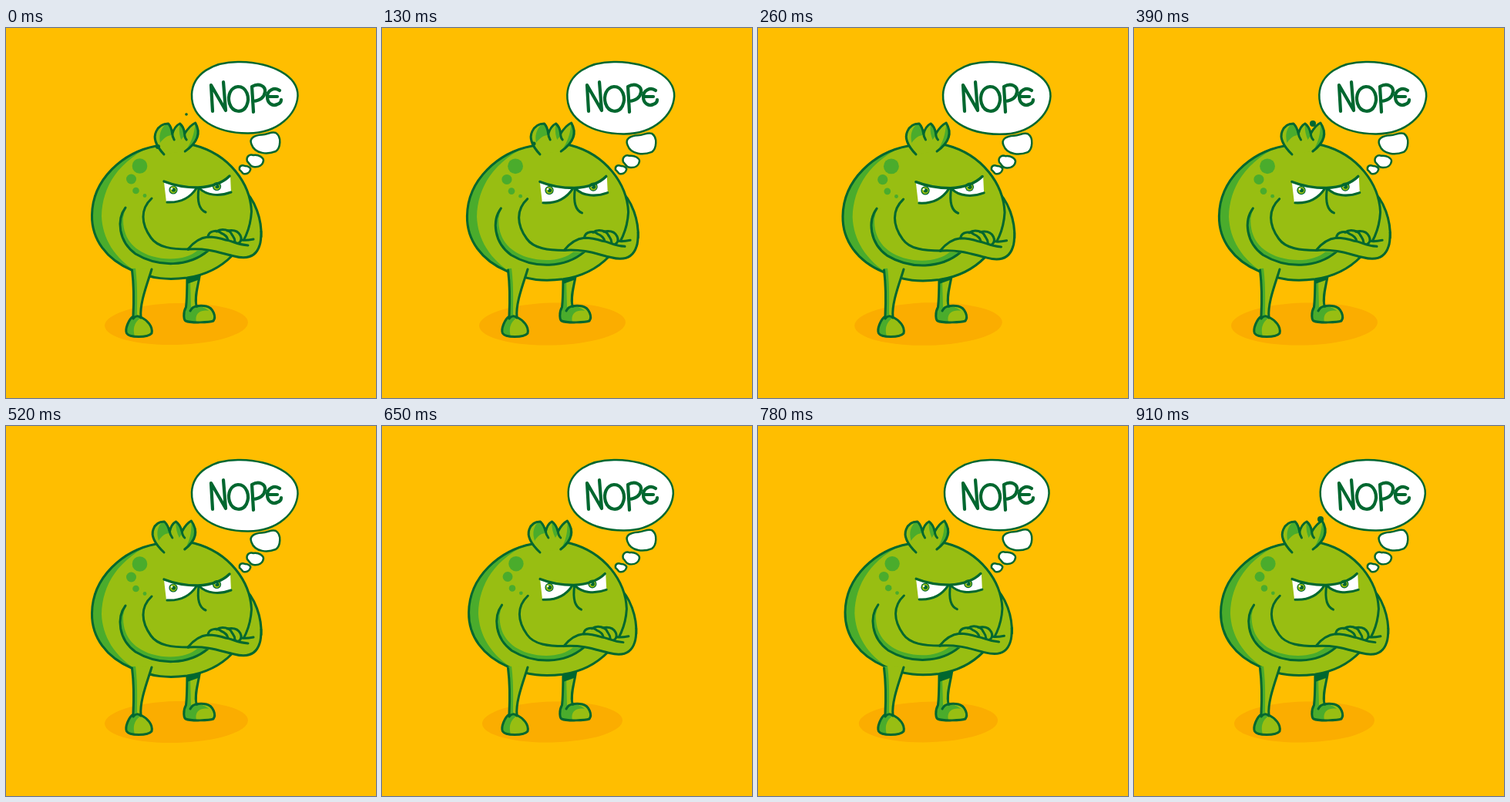
An HTML page with a canvas that plays this animation: 480 px wide and 480 px high, repeating every 1040 ms.

```html
<!DOCTYPE html>
<html lang="en">
<head>
<meta charset="utf-8">
<title>Nope</title>
<style>
html, body { margin: 0; width: 100%; height: 100%; overflow: hidden; background: #ffbe00; }
canvas { display: block; width: 480px; height: 480px; }
</style>
</head>
<body>
<canvas id="stage" width="480" height="480"></canvas>
<script>
const ctx = document.getElementById('stage').getContext('2d');
const STEP = 130, STEPS = 8;
const BG = '#ffbe00', SHADOW = '#fbad00', LIGHT = '#98be12', MID = '#4aac2c', INK = '#00672f', WHITE = '#fff';

const body = 'M195 153 C152 161 112 196 111.5 243 C111 274 130 300 163 314 C190 326 211 327 235 324 C282 317 316 283 318.5 238 C317 202 290 164 244 152 C228 149 210 149 195 153Z';
const upperArm = 'M306 208 C324 222 332 250 331 271 L300 285Z';
const forearm = 'M236 287 C244 277 252 272 262 271 C264 262 274 262 277 264 C281 259 287 259 291 263 C298 262 304 266 308 275 L321 274 L331 263 C331 290 323 298 308 298 C296 298 283 291 263 289.5Z';
const frontLeg = 'M163.5 312 C166 334 166 354 165 374 C159 378 154 391 156.5 396 C160 402 184 402 189 396 C191 387 183 379 175 375 C173 357 184 330 189 311Z';
const backLeg = 'M235 316 C235 335 235 350 233.5 362 C229 370 231 379 233 380 C240 383 264 382 269 380 C273 375 269 363 260 361 C255 360 251 360 247 361 C244 347 250 333 252 316Z';

function fill(d, color) {
  ctx.fillStyle = color;
  ctx.fill(new Path2D(d));
}

function line(d, width = 3) {
  ctx.strokeStyle = INK;
  ctx.lineWidth = width;
  ctx.stroke(new Path2D(d));
}

function shape(d, color, width) {
  fill(d, color);
  line(d, width);
}

// Shade kept inside a filled shape
function shaded(d, shade) {
  fill(d, LIGHT);
  ctx.save();
  ctx.clip(new Path2D(d));
  fill(shade, MID);
  ctx.restore();
}

function dot(x, y, r, color) {
  ctx.fillStyle = color;
  ctx.beginPath();
  ctx.arc(x, y, r, 0, Math.PI * 2);
  ctx.fill();
}

function scaled(x, y, k, draw) {
  ctx.save();
  ctx.translate(x, y);
  ctx.scale(k, k);
  ctx.translate(-x, -y);
  draw();
  ctx.restore();
}

function drawShadow(breath) {
  ctx.fillStyle = SHADOW;
  ctx.beginPath();
  ctx.ellipse(221, 384, 93 + 2.8 * breath, 27 + 0.7 * breath, -0.025, 0, Math.PI * 2);
  ctx.fill();
}

function drawBackLeg() {
  shaded(backLeg, 'M232 316 H239 C239 335 240 350 240 362 C247 360 257 361 263 367 C253 365 244 370 247 382 H229 V362Z');
  fill('M235 316 H252 L249 327 L235 332Z', INK);
  line(backLeg);
  line('M239 367 C241 363 244 361 248 361');
}

function drawFrontLeg() {
  shaded(frontLeg, 'M160 311 H168 C171 334 170 356 170 373 L175 376 C167 381 163 391 168 402 H150 V372 H162Z');
  line('M163.5 314 C166 334 166 354 165 374 C159 378 154 391 156.5 396 C160 402 184 402 189 396 C191 387 183 379 175 375 C173 357 184 330 189 313');
  line('M165 377 C168 373 172 373 175 376');
}

function drawEye(white, lid, x, y) {
  fill(white, WHITE);
  dot(x, y, 5.6, INK);
  dot(x, y, 4.4, LIGHT);
  dot(x + 0.5, y, 2.6, INK);
  dot(x - 2, y - 1.5, 1.3, WHITE);
  line(lid);
}

function drawFace() {
  drawEye('M205 200 C220 205 234 207 248 207 C239 222 224 228 208 226Z', 'M209 226 C226 227 239 220 247 208', 217, 210);
  drawEye('M251 208 C267 206 281 201 291 192 L292 213 C276 219 260 217 251 208Z', 'M292 213 C276 219 260 217 251 208', 273.5, 205.5);
  line('M205 199 C220 205 235 207 249 207 C267 206 280 202 290 192', 3.4);
  line('M250 208 C248 223 249 235 259 239');
}

function drawArms() {
  fill('M155 233 C143 249 146 277 168 293 C198 311 237 310 262 289 L248 289 C236 299 213 303 189 296 C164 288 151 271 152 246Z', MID);
  line('M155 233 C143 249 146 277 168 293 C198 311 237 310 262 289');
  line('M189 221 C174 235 175 254 188 272 C197 285 216 287 237 287');
  fill(forearm, LIGHT);
  line('M236 287 C244 277 252 272 262 271 C270 271 279 273 285 275 C294 276 299 281 314 282');
  line('M236 287 C264 285 281 293 296 296 C311 300 324 298 329 282 C331 277 331 269 331 264');
  line('M262 271 C263 262 275 262 279 266 C284 268 287 270 288 275');
  line('M273 264 C280 259 291 262 293 268 C295 271 297 273 297 277');
  line('M287 263 C297 261 302 265 304 269 C306 273 306 276 302 279');
  line('M306 275 C311 276 316 275 321 274');
}

function drawBody() {
  shape(upperArm, LIGHT);
  shaded(body, 'M195 150 C145 172 125 206 124 244 C125 272 140 299 172 318 L100 330 V150Z');
  line(body);
  dot(173.5, 179, 9.8, MID);
  dot(162.5, 196, 6.5, MID);
  dot(168.5, 211, 4.3, MID);
  dot(180, 217.5, 2.4, MID);
  drawFace();
  drawArms();
}

function drawCrown(sway) {
  ctx.save();
  ctx.transform(1, 0, -sway / 32, 1, sway * 164 / 32, 0);
  const leaves = 'M205 164 C195 154 189 143 193 134 C196 127 202 124 208 124 C212 128 213 132 214 137 C216 130 219 126 223 124 C227 127 229 131 230 137 C234 130 237 126 243 123 C252 137 247 149 232 160';
  shaded(leaves, 'M208 122 C199 129 196 138 199 149 C203 143 208 139 214 139Z M223 124 C222 131 223 138 226 145 L231 138Z M243 122 C243 136 240 148 232 160 L252 150 V122Z');
  line(leaves);
  line('M214 136 C214 139 215 142 217 145');
  line('M230 136 C230 140 231 143 233 145');
  ctx.restore();
}

function drawBubbles(breath) {
  scaled(310, 43, 1 + 0.014 * breath, () =>
    shape('M241 86 C242 60 268 43 304 44 C345 45 379 62 378.5 88 C377 111 354 137 313 136.5 C274 136 240 119 241 86Z', WHITE, 2.5));
  ctx.save();
  ctx.translate(0, 1.2 * breath);
  shape('M318.5 151 C315 143 322 139 332 138.5 C340 138 344 134 350 136 C358 141 356 156 350 160 C340 164 323 164 318.5 151Z', WHITE, 2.5);
  shape('M313 173 C311 167 316 163 321 165 C328 164 334 168 334 172 C333 178 328 181 321 180 C317 180 317 177 313 173Z', WHITE, 2.5);
  ctx.restore();
  shape('M303 184 C302 179 306 177 310 179 C315 179 318 182 317 184 C316 188 312 190 308 189 C306 188 306 186 303 184Z', WHITE, 2.5);
}

function drawLettering() {
  line('M268 108 L266 74 L285 107 L282 70', 4.2);
  line('M301 76 C291 77 287 88 290 98 C294 110 307 111 312 101 C317 90 312 76 301 76Z', 4.2);
  line('M321 109 L319 76 C328 71 337 75 336 83 C335 90 329 94 321 95', 4.2);
  line('M355 81 C348 76 339 81 339 89 C339 98 346 102 352 99 C355 98 357 96 357 93', 4.2);
  line('M340 89 H352', 4.2);
}

function drawSpecks(step) {
  const specks = {
    0: [[234, 112, 1.8], [197, 154, 3]],
    1: [[197, 150, 2.5]],
    3: [[232, 124, 4]],
    7: [[242, 121, 4]]
  };
  for (const [x, y, r] of specks[step] || []) dot(x, y, r, INK);
}

function draw(step) {
  const turn = Math.PI * 2 / STEPS;
  const breath = Math.sin(step * turn);
  const sway = 2.2 * Math.cos((step - 0.5) * turn);

  ctx.fillStyle = BG;
  ctx.fillRect(0, 0, 480, 480);
  drawShadow(breath);
  drawBackLeg();
  scaled(215, 152, 1 + 0.0148 * breath, drawBody);
  drawFrontLeg();
  drawCrown(sway);
  drawSpecks(step);
  drawBubbles(breath);
  drawLettering();
}

ctx.lineCap = ctx.lineJoin = 'round';
const start = performance.now();

function tick() {
  draw(Math.floor((performance.now() - start) / STEP) % STEPS);
  requestAnimationFrame(tick);
}
tick();
</script>
</body>
</html>
```
